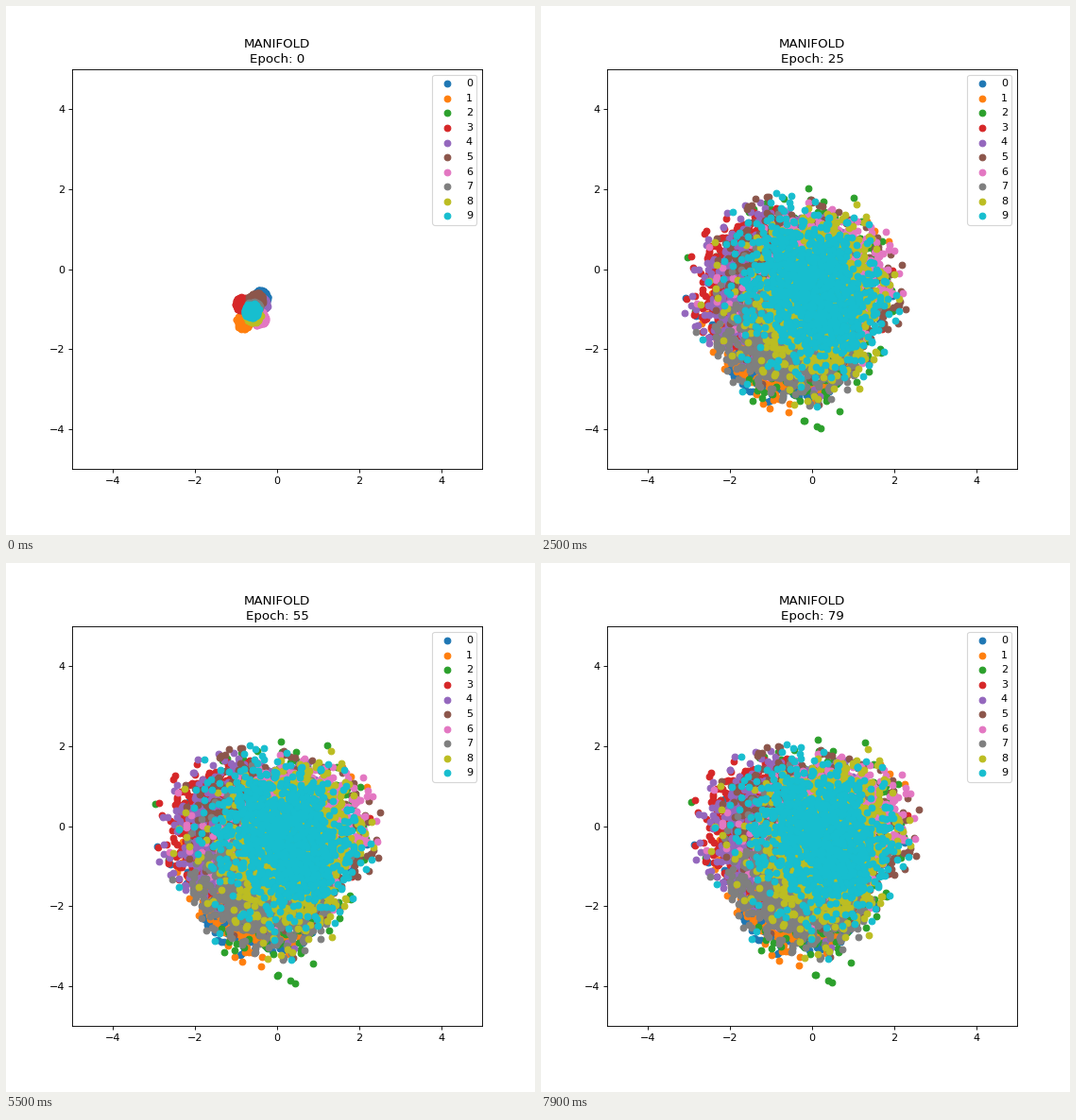
A matplotlib script for the animation above (8 s loop, 560 by 560 pixels).

```python
import numpy as np
import matplotlib.pyplot as plt
from matplotlib.animation import FuncAnimation

FRAMES, STEP_MS = 80, 100
POINTS = 1000
SETTLED = 13       # epoch at which the first expansion is over
STRAY_SHARE = 0.1  # part of each digit spread over the whole cloud

# Heading in degrees and distance from the cloud's centre, per digit:
# first in the small knot, then in the grown cloud
KNOT = [(50, 1.1), (243, 1.0), (0, 0.1), (147, 0.65), (28, 0.75),
        (60, 0.75), (312, 0.85), (10, 0.2), (294, 0.5), (310, 0.15)]
CLOUD = [(254, 0.47), (250, 0.42), (0, 0.1), (157, 0.40), (145, 0.28),
         (45, 0.22), (40, 0.42), (264, 0.40), (5, 0.23), (33, 0.21)]

rng = np.random.default_rng(7)


def unit_points(n):
    """Gaussian points with the far tail cut off, as complex numbers."""
    radius = np.sqrt(-2 * np.log(rng.uniform(0.02, 1, n)))
    return radius * np.exp(2j * np.pi * rng.random(n))


def polar(heading, reach):
    return reach * np.exp(1j * np.radians(heading))


def outline(p, centre, radius, corners):
    """Scale unit-disc points to a disc with three soft corners."""
    return centre + p * radius * (1 + corners * np.sin(3 * np.angle(p)))


def digit_path(knot, cloud):
    """Positions in the knot, after the expansion and after the drift."""
    z = unit_points(POINTS)
    first = outline(polar(*knot) + 0.18 * z, -0.65 - 1.0j, 0.36, 0)

    # Digits far from the centre are smaller, and wider across their heading
    size = 0.42 - 0.4 * cloud[1]
    oval = polar(cloud[0], size) * (0.82 * z.real + 1.1j * z.imag)
    stray = rng.random(POINTS) < STRAY_SHARE
    p = np.where(stray, 0.36 * z, polar(*cloud) + oval)
    return (first, outline(p, -0.62 - 0.95j, 2.65, 0.02),
            outline(p, -0.2 - 0.5j, 2.7, 0.12))


def ease_out(x, rate):
    """Exponential approach from 0 to 1 for x from 0 to 1."""
    x = np.clip(x, 0, 1)
    return (1 - np.exp(-rate * x)) / (1 - np.exp(-rate))


paths = [digit_path(k, c) for k, c in zip(KNOT, CLOUD)]

fig = plt.figure(figsize=(7, 7), dpi=80)
ax = fig.add_axes([0.125, 0.125, 0.775, 0.755])
dots = [ax.scatter(p[0].real, p[0].imag, label=str(d))
        for d, p in enumerate(paths)]
ax.set(xlim=(-5, 5), ylim=(-5, 5),
       xticks=range(-4, 5, 2), yticks=range(-4, 5, 2))
ax.legend(loc="upper right")
title = ax.set_title("MANIFOLD\nEpoch: 0", pad=6.6, linespacing=1.3)


def update(epoch):
    grow = ease_out(epoch / SETTLED, 5)
    drift = ease_out((epoch - SETTLED) / (FRAMES - 1 - SETTLED), 2.7)
    for dot, (first, middle, last) in zip(dots, paths):
        spread = middle + drift * (last - middle)
        p = first + grow * (spread - first)
        dot.set_offsets(np.column_stack((p.real, p.imag)))
    title.set_text(f"MANIFOLD\nEpoch: {epoch}")
    return [*dots, title]


anim = FuncAnimation(fig, update, frames=FRAMES, interval=STEP_MS,
                     repeat=True, repeat_delay=0, blit=False)
plt.show()
```
